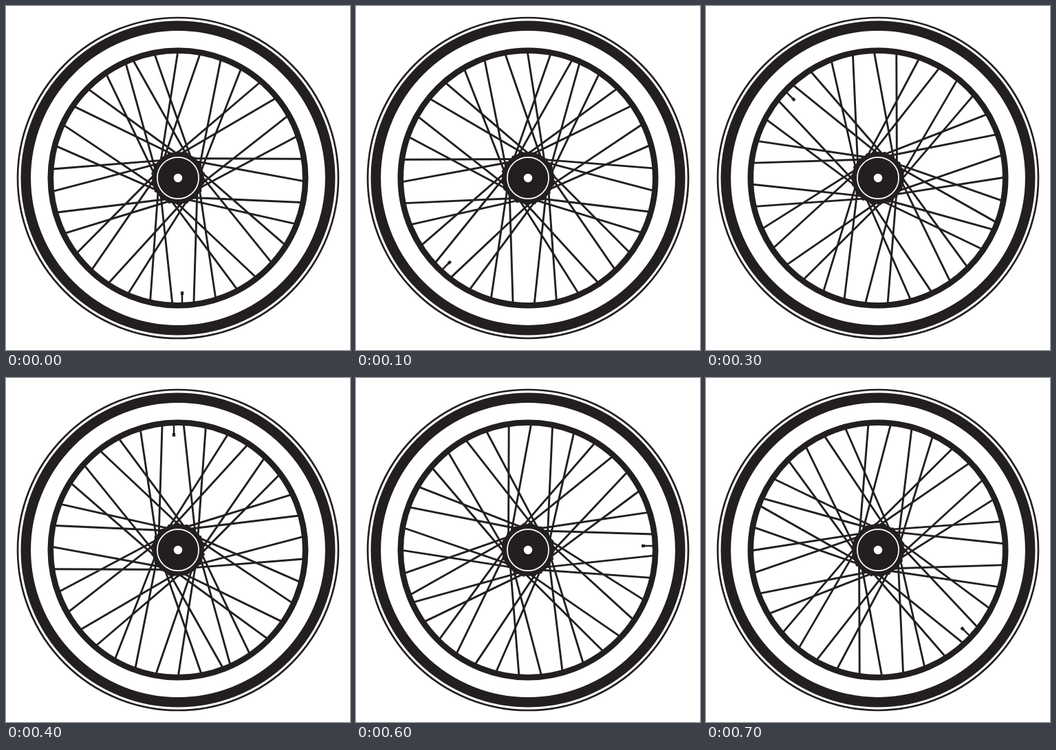
An HTML page for the animation above (800 ms loop, 500 by 500 pixels).

```html
<!DOCTYPE html>
<html lang="en">
<head>
<meta charset="utf-8">
<title>Spinning wheel</title>
<style>
  html, body { margin: 0; width: 100%; height: 100%; overflow: hidden; background: #fff; }
  svg { display: block; width: 100vw; height: 100vh; }
</style>
</head>
<body>
<svg viewBox="0 0 500 500">
  <g id="wheel" fill="none" stroke="#231f20"></g>
</svg>
<script>
const INK = '#231f20';
const SPOKES = 36, PITCH = 10.17, RIM = 183;
const STEP_MS = 100, STEPS = 8;
// The two ways a spoke leans past the hub.
const LEANS = [
  { side: -1, offset: -0.1, tangent: 28.5 },
  { side: 1, offset: -0.5, tangent: 27.5 }
];
const wheel = document.getElementById('wheel');

function add(tag, attrs) {
  const el = document.createElementNS('http://www.w3.org/2000/svg', tag);
  for (const key in attrs) el.setAttribute(key, attrs[key]);
  wheel.appendChild(el);
}

function ring(r, width, stroke = INK) {
  add('circle', { r, stroke, 'stroke-width': width });
}

function disc(r, fill, cx = 0, cy = 0) {
  add('circle', { r, cx, cy, fill, stroke: 'none' });
}

// Clockwise degrees from twelve o'clock.
function polar(r, deg) {
  const a = deg * Math.PI / 180;
  return [r * Math.sin(a), -r * Math.cos(a)];
}

// Each spoke runs from the rim to its tangent point; leans alternate in pairs.
function spokes() {
  let d = '';
  for (let i = -2; i < SPOKES - 2; i++) {
    const { side, offset, tangent } = LEANS[(i + 4) % 4 < 2 ? 0 : 1];
    const swing = Math.acos(tangent / RIM) * 180 / Math.PI;
    const angle = i * PITCH + offset;
    d += `M${polar(RIM, angle)}L${polar(tangent, angle + side * swing)}`;
  }
  add('path', { d, 'stroke-width': 2.9 });
}

function hub() {
  disc(38, INK);
  for (let i = 0; i < 18; i++) disc(2.4, INK, ...polar(37, i * 20));
  ring(30.1, 1.7, '#fff');
  disc(6.2, '#fff');
}

ring(233, 2.7);
ring(221.2, 14.6);
ring(185.2, 8.6);
spokes();
add('path', { d: 'M6 183V166', 'stroke-width': 2.5 });
add('path', { d: 'M6 170V165', 'stroke-width': 4.2 });
hub();

function draw(now) {
  const step = Math.floor(now / STEP_MS) % STEPS;
  wheel.setAttribute('transform', `translate(250 250) rotate(${step * 360 / STEPS})`);
}

let start = null;
function tick(now) {
  if (start === null) start = now;
  draw(now - start);
  requestAnimationFrame(tick);
}
draw(0);
requestAnimationFrame(tick);
</script>
</body>
</html>
```
